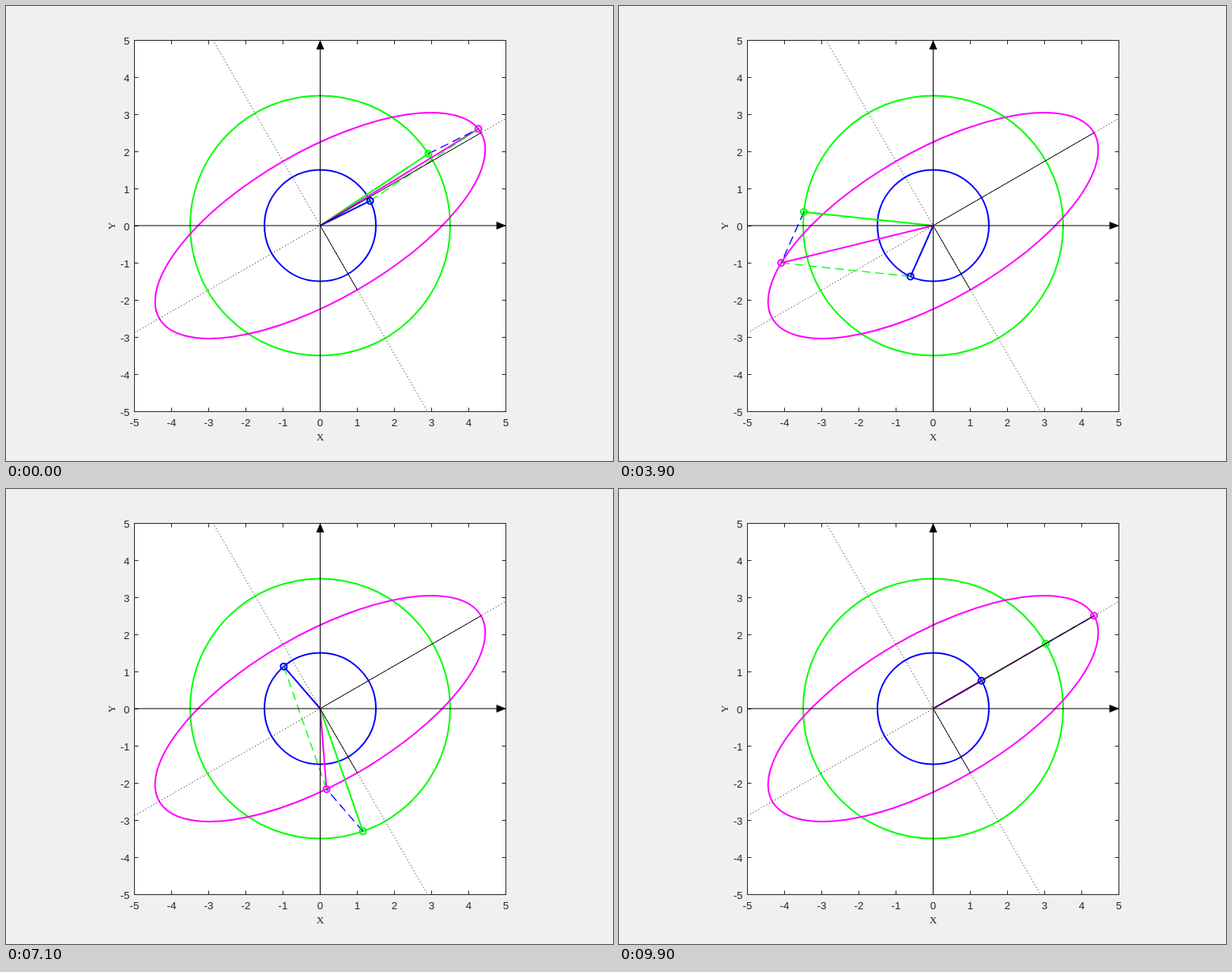
An HTML page that plays this animation: 768x576 px, repeating every 10 s.

```html
<!DOCTYPE html>
<html lang="en">
<head>
<meta charset="utf-8">
<title>Ellipse from two rotating vectors</title>
<style>
  html, body { margin: 0; width: 100%; height: 100%; overflow: hidden; background: #f0f0f0; }
  svg { display: block; }
  text { fill: #262626; }
  .tick { font: 13.33px "Liberation Sans", Arial, sans-serif; }
  .label { font: 13.33px "Liberation Serif", "Times New Roman", serif; text-anchor: middle; }
</style>
</head>
<body>
<svg id="stage" width="768" height="576" viewBox="0 0 768 576"></svg>
<script>
const CX = 397.5, CY = 278, UNIT = 47;
const BIG = 3.5, SMALL = 1.5, TILT = 30;
const LOOP = 10000, STEPS = 100;
const GREEN = '#0f0', BLUE = '#00f', PINK = '#f0f', INK = '#262626';
const BOX = { left: 162.5, right: 632.5, top: 43.5, bottom: 513.5 };

const stage = document.getElementById('stage');
const px = x => CX + x * UNIT;
const py = y => CY - y * UNIT;
const polar = (r, deg) => {
  const a = deg * Math.PI / 180;
  return [r * Math.cos(a), r * Math.sin(a)];
};

function add(tag, attrs, text) {
  const el = document.createElementNS('http://www.w3.org/2000/svg', tag);
  setAll(el, attrs);
  if (text !== undefined) el.textContent = text;
  stage.append(el);
  return el;
}

function setAll(el, attrs) {
  for (const key in attrs) el.setAttribute(key, attrs[key]);
}

function place(el, a, b) {
  setAll(el, { x1: px(a[0]), y1: py(a[1]), x2: px(b[0]), y2: py(b[1]) });
}

function line(color, width, dash = 'none') {
  return add('line', { stroke: color, 'stroke-width': width, 'stroke-dasharray': dash });
}

function ring(color, rx, ry = rx) {
  return add('ellipse', { cx: CX, cy: CY, rx, ry, fill: 'none', stroke: color, 'stroke-width': 2 });
}

// Plot box, ticks and labels
add('rect', { x: BOX.left, y: BOX.top, width: 470, height: 470, fill: '#fff', stroke: INK });
for (let n = -5; n <= 5; n++) {
  const x = BOX.left + (n + 5) * UNIT;
  const y = BOX.bottom - (n + 5) * UNIT;
  add('path', {
    d: `M${x} ${BOX.top}v5M${x} ${BOX.bottom}v-5M${BOX.left} ${y}h5M${BOX.right} ${y}h-5`,
    stroke: INK
  });
  add('text', { class: 'tick', x, y: 532, 'text-anchor': 'middle' }, n);
  add('text', { class: 'tick', x: 156.5, y: y + 5.5, 'text-anchor': 'end' }, n);
}
add('text', { class: 'label', x: CX, y: 550 }, 'X');
add('text', { class: 'label', transform: 'translate(138 278.5) rotate(-90)' }, 'Y');

// Curves
ring(GREEN, BIG * UNIT);
ring(BLUE, SMALL * UNIT);
ring(PINK, (BIG + SMALL) * UNIT, (BIG - SMALL) * UNIT)
  .setAttribute('transform', `rotate(${-TILT} ${CX} ${CY})`);

// Moving parts
const arms = [GREEN, BLUE, PINK].map(c => line(c, 2));
const blueLink = line(BLUE, 1.33, '11 6');
const greenLink = line(GREEN, 1.33, '11 6');
const dots = [GREEN, BLUE, PINK].map(c =>
  add('circle', { r: 4, fill: 'none', stroke: c, 'stroke-width': 2 }));

// Principal axes of the ellipse
const reach = 5 * Math.tan(TILT * Math.PI / 180);
place(line('#000', 1, '1 3'), [-5, -reach], [5, reach]);
place(line('#000', 1, '1 3'), [-reach, 5], [reach, -5]);
place(line('#000', 1), [0, 0], polar(BIG + SMALL, TILT));
place(line('#000', 1), [0, 0], polar(BIG - SMALL, TILT - 90));

// Coordinate arrows
add('path', { d: `M${BOX.left} ${CY}H622M${CX} ${BOX.bottom}V54`, stroke: '#000' });
add('path', { d: `M633 ${CY}l-12.5 -5v10zM${CX} 43l-5 12h10z` });

function draw(now) {
  const step = Math.floor((now % LOOP) / LOOP * STEPS) + 1;
  const turn = step * 360 / STEPS;
  const g = polar(BIG, TILT + turn);
  const b = polar(SMALL, TILT - turn);
  const sum = [g[0] + b[0], g[1] + b[1]];
  [g, b, sum].forEach((p, i) => {
    place(arms[i], [0, 0], p);
    setAll(dots[i], { cx: px(p[0]), cy: py(p[1]) });
  });
  place(blueLink, g, sum);
  place(greenLink, b, sum);
}

let start;
function tick(now) {
  if (start === undefined) start = now;
  draw(Math.max(0, now - start));
  requestAnimationFrame(tick);
}
draw(0);
requestAnimationFrame(tick);
</script>
</body>
</html>
```
